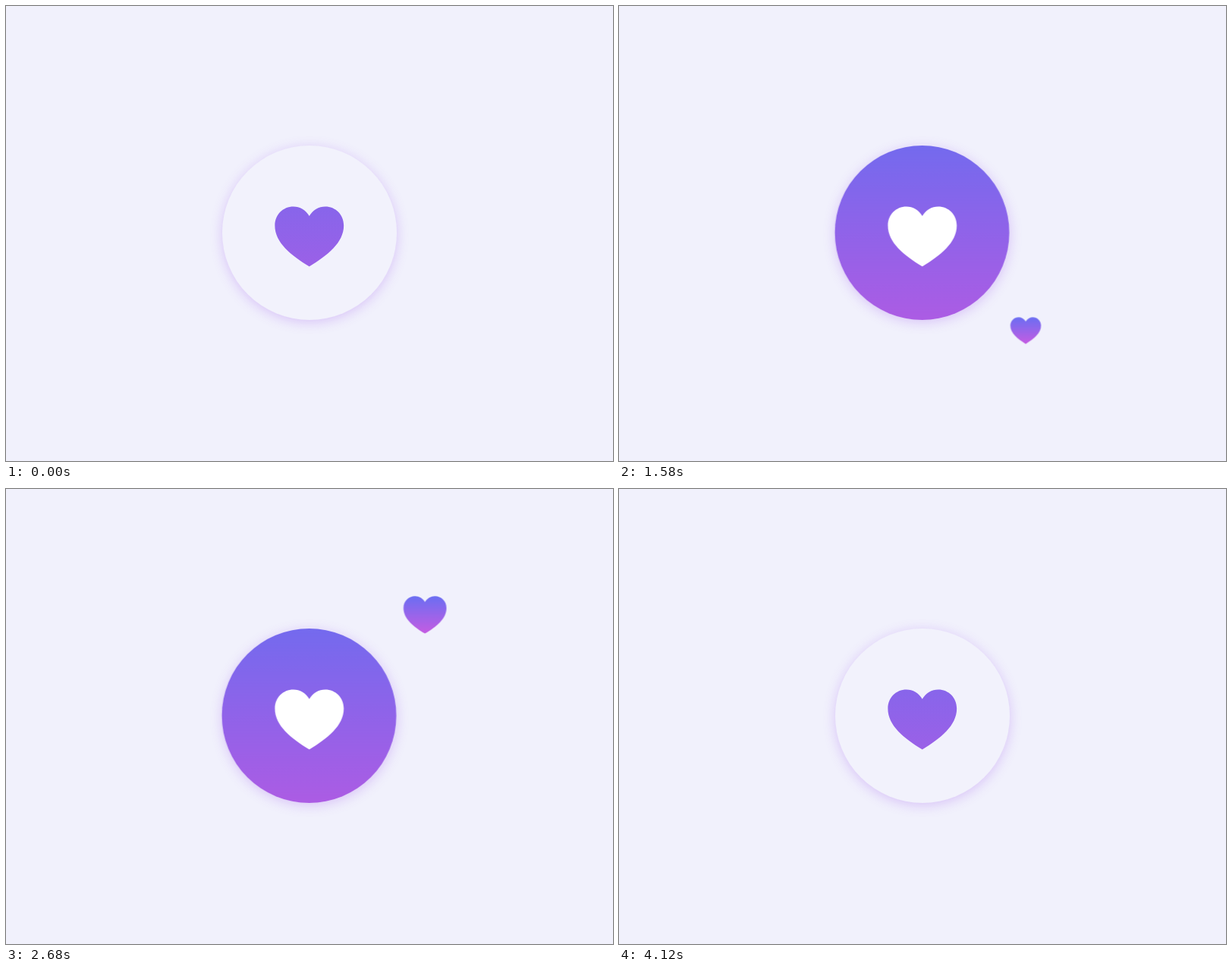
An HTML page for the animation above (4820 ms loop, 800 by 600 pixels).

```html
<!DOCTYPE html>
<html lang="en">
<head>
<meta charset="utf-8">
<title>Like button</title>
<style>
  :root { --loop: 4820ms; }
  html, body { margin: 0; width: 100%; height: 100%; overflow: hidden; background: #f1f1fc; }
  .stage { position: relative; width: 800px; height: 600px; overflow: hidden; }
  .glow, .cursor, svg { position: absolute; }
  .glow {
    left: 284.5px; top: 184px; width: 230px; height: 230px; border-radius: 50%;
    background: #f2f2fc; box-shadow: 0 3px 16px rgba(160, 90, 240, .3);
  }
  svg { left: 0; top: 0; }
  .cursor {
    left: 440px; top: 330px; width: 45px; height: 45px; border-radius: 50%;
    background: rgba(255, 255, 255, .6); box-shadow: 0 0 6px rgba(0, 0, 0, .36);
    animation: tap var(--loop) step-end infinite;
  }
  .liked { animation: like var(--loop) infinite; }
  .pop { animation: pop var(--loop) var(--start) infinite backwards; }

  /* 160 ms in, 720 ms out */
  @keyframes tap {
    0% { opacity: 0; }
    3.32% { opacity: 1; }
    14.938%, 100% { opacity: 0; }
  }
  /* on 420-940 ms, off 3780-4120 ms */
  @keyframes like {
    0% { opacity: 0; }
    8.714% { opacity: 0; animation-timing-function: cubic-bezier(.85, 0, .15, 1); }
    19.502% { opacity: 1; }
    78.423% { opacity: 1; animation-timing-function: ease-in-out; }
    85.477%, 100% { opacity: 0; }
  }
  /* grow, linger, swell and vanish within 900 ms */
  @keyframes pop {
    0% { transform: scale(0); animation-timing-function: ease-out; }
    3.734% { transform: scale(.9); animation-timing-function: linear; }
    9.336% { transform: scale(1); animation-timing-function: linear; }
    12.448% { transform: scale(1.03); animation-timing-function: ease-in-out; }
    16.183% { transform: scale(1.5); animation-timing-function: cubic-bezier(.33, 0, .67, 1); }
    18.672%, 100% { transform: scale(0); }
  }
</style>
</head>
<body>
<div class="stage">
  <div class="glow"></div>
  <svg width="800" height="600" viewBox="0 0 800 600">
    <defs>
      <linearGradient id="face" gradientUnits="userSpaceOnUse" x1="0" y1="-120" x2="0" y2="110">
        <stop offset="0" stop-color="#746aee"/>
        <stop offset="1" stop-color="#ac5ce4"/>
      </linearGradient>
      <linearGradient id="small" x1="0" y1="0" x2="0" y2="1">
        <stop offset="0" stop-color="#6b6ef2"/>
        <stop offset="1" stop-color="#c65ce2"/>
      </linearGradient>
      <path id="heart" d="M0-27C-4.5-35-12.5-39.5-21-39.5C-34.5-39.5-45.4-29-45.4-14.5
        C-45.4 8-24 25 0 39.5C24 25 45.4 8 45.4-14.5C45.4-29 34.5-39.5 21-39.5C12.5-39.5 4.5-35 0-27Z"/>
    </defs>
    <g transform="translate(399.75 304)">
      <use href="#heart" fill="url(#face)"/>
      <g class="liked">
        <circle cx="-.25" cy="-5" r="115" fill="url(#face)"/>
        <use href="#heart" fill="#fff"/>
      </g>
    </g>
    <g fill="url(#small)">
      <g transform="translate(196.2 217.2) scale(.625)"><use class="pop" style="--start:660ms" href="#heart"/></g>
      <g transform="translate(536 428) scale(.44)"><use class="pop" style="--start:1072ms" href="#heart"/></g>
      <g transform="translate(204.2 339) scale(.625)"><use class="pop" style="--start:1725ms" href="#heart"/></g>
      <g transform="translate(552.2 166) scale(.625)"><use class="pop" style="--start:2235ms" href="#heart"/></g>
    </g>
  </svg>
  <div class="cursor"></div>
</div>
</body>
</html>
```
